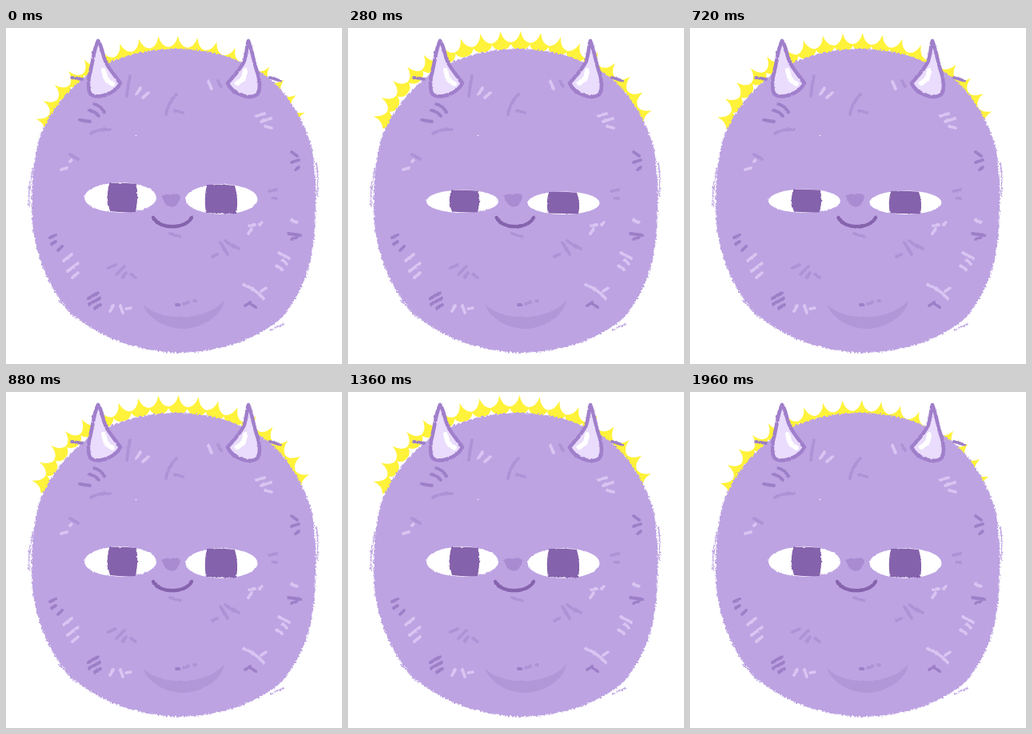
An HTML page for the animation above (2 s loop, 420 px wide and 420 px high).

```html
<!DOCTYPE html>
<html lang="en">
<head>
<meta charset="utf-8">
<title>Fluffy monster</title>
<style>
  html, body { margin: 0; width: 100%; height: 100%; overflow: hidden; background: #fff; }
  svg { display: block; width: 100vw; height: 100vh; }
  .tuft { fill: none; stroke-width: 3.8; stroke-linecap: round; }
  .horn { fill: #eadcfc; stroke: #a07fcb; stroke-width: 4.6; stroke-linejoin: round; }
  .shine { fill: none; stroke: #fff; stroke-width: 6; stroke-linecap: round; stroke-linejoin: round; }
  .pupil { fill: #8562ac; }
</style>
</head>
<body>
<svg viewBox="0 0 420 420">
  <defs>
    <filter id="fur" filterUnits="userSpaceOnUse" x="0" y="0" width="420" height="420" color-interpolation-filters="sRGB">
      <feTurbulence type="fractalNoise" baseFrequency=".4" numOctaves="2" seed="4"/>
      <feDisplacementMap in="SourceGraphic" scale="5" xChannelSelector="R" yChannelSelector="G"/>
    </filter>
    <filter id="chalk" filterUnits="userSpaceOnUse" x="0" y="0" width="420" height="420" color-interpolation-filters="sRGB">
      <feTurbulence type="fractalNoise" baseFrequency=".3" numOctaves="2" seed="9"/>
      <feDisplacementMap in="SourceGraphic" scale="2.5" xChannelSelector="R" yChannelSelector="G"/>
    </filter>
  </defs>

  <path id="sun" fill="#fff23a"/>

  <g filter="url(#fur)">
    <path fill="#bda3e2" d="M215 26 C258 26 298 40 328 62 C354 83 371 115 380 142
      C388 170 389 215 386 250 C384 290 374 326 346 361 C318 387 270 405 218 406
      C165 405 118 387 85 359 C56 332 39 290 34 252 C30 218 32 178 40 145
      C48 113 73 80 103 58 C135 35 177 26 215 26 Z"/>
    <path fill="none" stroke="#bda3e2" stroke-width="1.5"
      d="M34 175 Q27 198 29 223 M388 168 Q391 188 389 210 M66 340 L88 364 M330 378 L347 370"/>
  </g>

  <g id="tufts" filter="url(#chalk)">
    <path fill="#b197d7" d="M171 345 C190 367 251 368 273 340 C270 359 248 375 221 376 C196 375 177 362 171 345 Z"/>
  </g>
  <circle cx="162.5" cy="134.5" r=".8" fill="#fff"/>

  <g filter="url(#chalk)">
    <path class="horn" d="M115 16 C109 29 109 40 106 52 C102 65 102 78 106 83
      C114 89 136 83 143 69 C137 60 128 51 124 41 C120 31 120 22 115 16 Z"/>
    <path class="shine" d="M122 53 L125 64 L133 70"/>
    <path class="horn" d="M303 16 C308 29 309 40 313 52 C318 66 318 78 314 83
      C305 90 283 83 277 69 C284 61 293 52 298 41 C301 31 301 22 303 16 Z"/>
    <path class="shine" d="M299 53 L297 63 L289 69"/>
  </g>

  <g id="nose" filter="url(#chalk)">
    <path fill="#a98bd2" d="M195 210 Q197 207 206 208 Q217 206 218 211 Q216 223 207 224 Q197 222 195 210 Z"/>
  </g>

  <g id="leftEye"><g filter="url(#chalk)">
    <ellipse cx="143" cy="212" rx="45" ry="18.8" fill="#fff"/>
    <path class="pupil" d="M129 194 Q146 193 163 195 Q166 212 162 230 Q146 231 130 229 Q124 212 129 194 Z"/>
  </g></g>
  <g id="rightEye"><g filter="url(#chalk)">
    <ellipse cx="269.5" cy="214" rx="45" ry="18.8" fill="#fff"/>
    <path class="pupil" d="M251 196 Q269 195 286 197 Q291 214 288 232 Q269 232 250 231 Q247 214 251 196 Z"/>
  </g></g>

  <g id="mouth"><g filter="url(#chalk)">
    <path d="M184 237 C192 252 224 252 232 237" fill="none" stroke="#8663ad" stroke-width="4.4" stroke-linecap="round"/>
  </g></g>
</svg>
<script>
  const $ = id => document.getElementById(id);
  const LOOP = 2000, STEP = 40, PULSE = 560;

  // Fur strokes by shade.
  const tufts = {
    '#9c7fc7': 'M82 62L95 64M330 62L343 66M110 95Q118 97 123 105M104 103Q111 104 116 110M92 115L105 117' +
      'M357 155L364 160M357 168L366 165M362 177L366 174M55 262L62 259M57 270L62 267M65 278L70 273' +
      'M103 338L115 331M104 345L117 338M111 350L118 346M353 257L368 259M357 264L363 262' +
      'M299 347L305 343M306 345L312 349M213 346L216 346',
    '#ae92d6': 'M106 132Q116 126 130 127M155 60Q152 73 151 85M213 83Q202 94 200 108M211 103L221 106' +
      'M265 66L269 73M80 158L90 164M329 204L338 202M333 213L338 213M128 300L137 296M138 308L148 298' +
      'M146 312L150 306M156 308L162 312M205 257L218 261M268 268L277 283M274 266L285 274' +
      'M258 286L264 283M283 271L291 276M222 345L228 343M235 341L237 341',
    '#d9c5f2': 'M163 83L168 75M171 87L178 81M253 67L257 76M313 110L323 107M319 117L331 113M324 123L332 125' +
      'M69 177L76 175M80 167L82 165M72 291L82 283M77 304L90 294M83 312L90 306M130 354L134 347' +
      'M143 347L146 356M150 351L156 350M303 257L307 251M304 247L311 246M317 246L320 243M357 240L363 243' +
      'M341 281L354 288M346 290L351 295M338 297L345 302M297 321Q310 325 322 338M319 329L325 325'
  };
  for (const [color, d] of Object.entries(tufts)) {
    const p = document.createElementNS('http://www.w3.org/2000/svg', 'path');
    p.setAttribute('class', 'tuft');
    p.setAttribute('stroke', color);
    p.setAttribute('d', d);
    $('tufts').append(p);
  }

  // Point on the ring of ray tips, "arc" px along from the top and "depth" px inwards.
  function ringPoint(arc, depth) {
    const rx = 174, ry = 133.5, n = 100;
    let a = 0;
    for (let i = 0; i < n; i++) a += arc / n / Math.hypot(rx * Math.cos(a), ry * Math.sin(a));
    const nx = ry * Math.sin(a), ny = -rx * Math.cos(a), len = Math.hypot(nx, ny);
    const x = 207 + rx * Math.sin(a) - depth * nx / len;
    const y = 143.5 - ry * Math.cos(a) - depth * ny / len;
    return x.toFixed(1) + ' ' + y.toFixed(1);
  }

  // Each ray has a sharp tip, hollow sides and a rounded foot.
  function ray(i) {
    const gap = 24.5, at = (k, depth) => ringPoint(8 + (i + k) * gap, depth);
    return `M${at(0, 0)}Q${at(0.12, 13)} ${at(0.53, 14)}Q${at(0.4, 23)} ${at(0, 23)}` +
      `Q${at(-0.4, 23)} ${at(-0.53, 14)}Q${at(-0.12, 13)} ${at(0, 0)}Z`;
  }
  $('sun').setAttribute('d', Array.from({ length: 18 }, (_, i) => ray(i - 9)).join(''));

  const ease = x => (1 - Math.cos(Math.PI * Math.min(1, Math.max(0, x)))) / 2;
  const squint = t => t <= 560 ? ease(t / 560) : 1 - ease((t - 560) / 300);
  const pulse = t => t < 3 * PULSE ? (1 - Math.cos(2 * Math.PI * t / PULSE)) / 2 : 0;

  const scaleAt = (el, x, y, sx, sy, turn = 0) => el.setAttribute('transform',
    `translate(${x} ${y}) rotate(${turn}) scale(${sx} ${sy}) translate(${-x} ${-y})`);

  function draw(t) {
    const s = squint(t), grow = 1 + 0.034 * pulse(t);
    scaleAt($('sun'), 208, 198, grow, grow, 0.25 * Math.sin(2 * Math.PI * t / LOOP));
    scaleAt($('leftEye'), 143, 231.5, 1, 1 - 0.48 * s);
    scaleAt($('rightEye'), 269, 233.5, 1, 1 - 0.48 * s);
    scaleAt($('mouth'), 232, 248, 1 - 0.07 * s, 1);
    $('nose').setAttribute('transform', `translate(0 ${-0.7 * s})`);
  }

  const start = performance.now();
  function tick() {
    const t = (performance.now() - start) % LOOP;
    draw(Math.floor(t / STEP) * STEP);
    requestAnimationFrame(tick);
  }
  tick();
</script>
</body>
</html>
```
